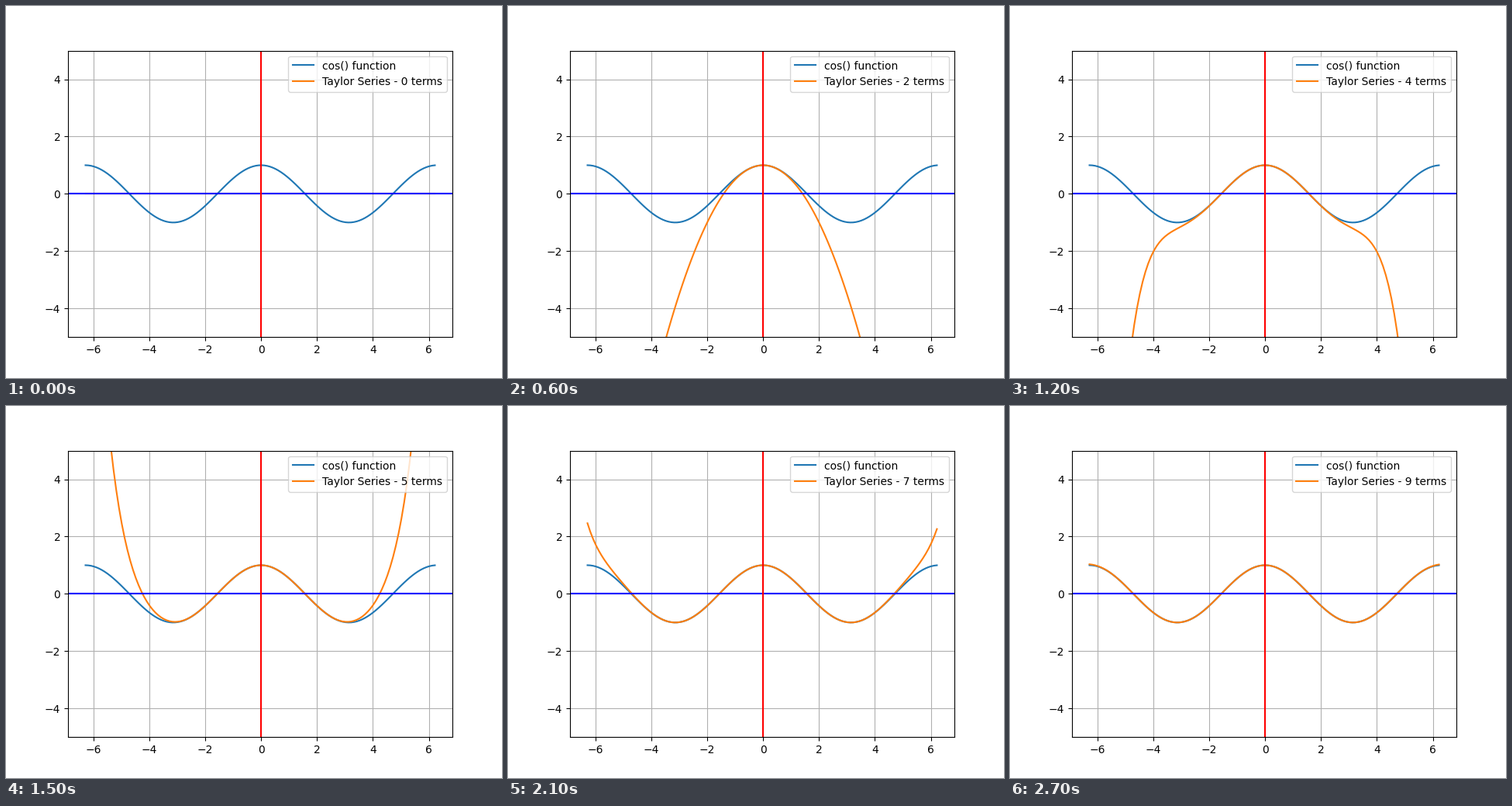
A matplotlib script that plays this animation: 640x480 px, repeating every 3000 ms.

```python
import math

import matplotlib.pyplot as plt
import numpy as np
from matplotlib.animation import FuncAnimation

FRAMES = 10
INTERVAL = 300

x = np.arange(-2 * np.pi, 2 * np.pi, 0.1)


def taylor_cos(x, terms):
    """Partial sum of the cosine series with the given number of terms."""
    total = np.zeros_like(x)
    for n in range(terms):
        total += (-1) ** n * x ** (2 * n) / math.factorial(2 * n)
    return total


def series_label(terms):
    return f"Taylor Series - {terms} terms"


fig, ax = plt.subplots(figsize=(6.4, 4.8), dpi=100)
ax.plot(x, np.cos(x), label="cos() function")
series, = ax.plot(x, taylor_cos(x, 0), label=series_label(0))
ax.axhline(0, color="blue")
ax.axvline(0, color="red")
ax.set_ylim(-5, 5)
ax.grid(True)
legend = ax.legend(loc="upper right")
series_text = legend.get_texts()[1]


def update(terms):
    series.set_ydata(taylor_cos(x, terms))
    series_text.set_text(series_label(terms))
    return series, series_text


anim = FuncAnimation(fig, update, frames=FRAMES, interval=INTERVAL,
                     repeat=True, repeat_delay=0, blit=False)
plt.show()
```
